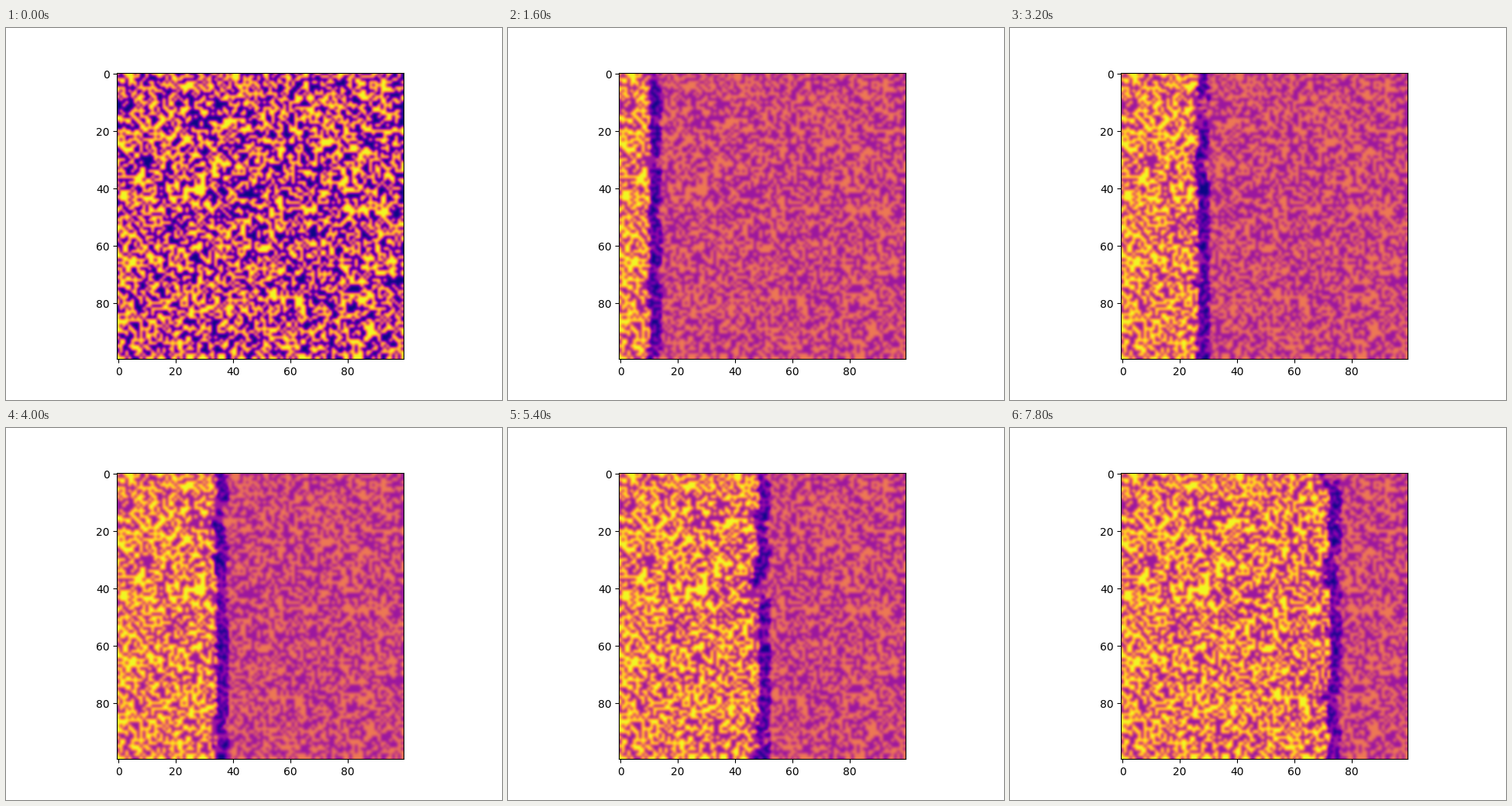
Write a matplotlib script that moves like this. It is 640 px wide and 480 px high and loops after 8 s.

```python
import numpy as np
import matplotlib.pyplot as plt
from matplotlib.animation import FuncAnimation

SIZE, FRAMES, INTERVAL = 100, 40, 200
EMPTY, TREE, BURNING, BURNT = 0, 1, -1, 2
DENSITY = 0.5    # share of cells with a tree
REACH = 2        # how many cells a spark can jump
CATCH = 0.6      # chance that one burning neighbour lights a tree
BURN_TIME = 2    # steps a tree keeps burning

rng = np.random.default_rng(12)


def burning_neighbours(fire):
    padded = np.pad(fire.astype(int), REACH)
    width = 2 * REACH + 1
    return sum(padded[r:r + SIZE, c:c + SIZE]
               for r in range(width) for c in range(width))


def spread(trees):
    """Step at which each tree catches fire, starting at the left edge."""
    lit = np.full((SIZE, SIZE), FRAMES)
    lit[trees[:, 0], 0] = 1
    for step in range(2, FRAMES):
        fire = (lit < step) & (lit >= step - BURN_TIME)
        chance = 1 - (1 - CATCH) ** burning_neighbours(fire)
        caught = rng.random((SIZE, SIZE)) < chance
        lit[trees & (lit == FRAMES) & caught] = step
    return lit


trees = rng.random((SIZE, SIZE)) < DENSITY
lit = spread(trees)


def state(step):
    grid = np.where(trees, TREE, EMPTY)
    grid[lit <= step] = BURNING
    grid[lit <= step - BURN_TIME] = BURNT
    return grid


fig, ax = plt.subplots(figsize=(6.4, 4.8), dpi=100)
image = ax.imshow(state(0), cmap="plasma", interpolation="bicubic")


def update(step):
    image.set_data(state(step))
    image.autoscale()
    return [image]


anim = FuncAnimation(fig, update, frames=FRAMES, interval=INTERVAL,
                     repeat=True, repeat_delay=0)
plt.show()
```
